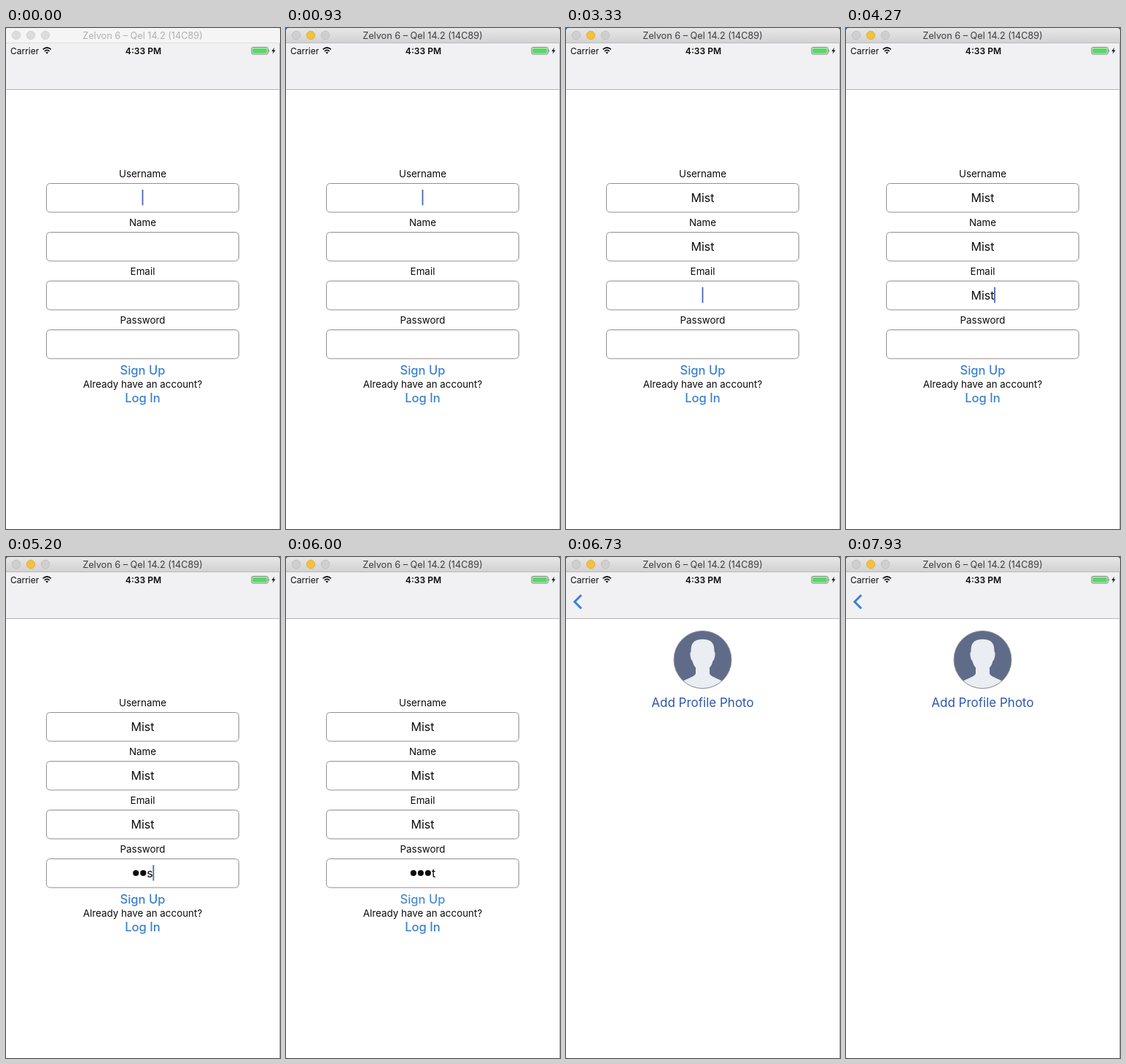
These frames come from a looping animation (376x688 px, 8000 ms). An HTML page:

```html
<!DOCTYPE html>
<html lang="en">
<head>
<meta charset="utf-8">
<title>Sign up form</title>
<style>
html, body { margin: 0; width: 100%; height: 100%; overflow: hidden; background: #fff; }
svg { display: block; width: 376px; height: 688px; }
text { font-family: Inter, Roboto, sans-serif; fill: #0b0b0b; }
.mid { text-anchor: middle; }
.label { font-size: 13.4px; }
.link { font-size: 16.6px; font-weight: 500; fill: #3a80d2; }
.value { font-size: 16px; }
</style>
</head>
<body>
<svg id="stage" viewBox="0 0 376 688">
  <defs>
    <linearGradient id="bar" x1="0" y1="0" x2="0" y2="1">
      <stop offset="0" stop-color="#e8e7e8"/>
      <stop offset="1" stop-color="#d3d2d3"/>
    </linearGradient>
    <clipPath id="disc"><circle cx="187.5" cy="141" r="39.5"/></clipPath>
  </defs>
  <rect width="376" height="688" fill="#fff"/>

  <g id="form">
    <g id="fields"></g>
    <text id="signUp" class="mid link" x="187.5" y="476">Sign Up</text>
    <text class="mid label" x="187.5" y="493.5">Already have an account?</text>
    <text class="mid link" x="187.5" y="514">Log In</text>
  </g>

  <g id="profile">
    <rect y="85" width="376" height="603" fill="#fff"/>
    <circle cx="187.5" cy="141" r="39.5" fill="#5f6b88"/>
    <path clip-path="url(#disc)" fill="#eaedf1" d="M187.5 113C198 113 204 117 203.500 130Q205.500 131 204 138Q203 142 201.500 143Q200 149 197 152V160C199 166 214 167 221 176V184H154V176C161 167 176 166 178 160V152Q175 149 173.500 143Q172 142 171 138Q169.500 131 171.500 130C171 117 177 113 187.500 113Z"/>
    <circle cx="187.5" cy="141" r="39.5" fill="none" stroke="#8b8d93"/>
    <text class="mid" x="187.5" y="206.300" font-size="17" style="fill:#2d57ab">Add Profile Photo</text>
  </g>

  <rect y="20" width="376" height="65" fill="#f1f1f3"/>
  <rect y="84" width="376" height="1" fill="#b4b4b7"/>
  <path id="back" d="M21 52.300L11.800 61.500L21 70.700" fill="none" stroke="#3a80d2" stroke-width="3"/>

  <text x="6" y="35.500" font-size="12">Carrier</text>
  <g fill="none" stroke="#111" stroke-width="1.700">
    <path d="M50.600 29.400Q56.200 24.600 61.800 29.400"/>
    <path d="M52.800 31.900Q56.200 28.900 59.600 31.900"/>
  </g>
  <path d="M54.300 33.500Q56.200 31.900 58.100 33.500L56.200 35.500Z" fill="#111"/>
  <text class="mid" x="188.500" y="35.500" font-size="12.100" font-weight="600">4:33 PM</text>
  <rect x="337" y="26.500" width="22.500" height="9.500" rx="2" fill="#fff" stroke="#66706a" stroke-width=".9"/>
  <rect x="338.200" y="27.700" width="20.100" height="7.100" rx="1" fill="#5bd768"/>
  <path d="M360.700 29.500Q362.400 31.200 360.700 33Z" fill="#555"/>
  <path d="M368.300 26.800L364.500 31.900H366.800L365.700 35.800L369.700 30.500H367.300Z" fill="#111"/>

  <g id="titleBar">
    <rect id="corners" width="376" height="6" fill="#2f5f94"/>
    <path id="barFill" d="M0 20V4Q0 0 4 0H372Q376 0 376 4V20Z"/>
    <rect id="barEdge" y="20" width="376" height="1"/>
    <g stroke-width=".8">
      <circle class="light" cx="14" cy="10" r="5.800"/>
      <circle class="light" id="yellow" cx="34" cy="10" r="5.800"/>
      <circle class="light" cx="54" cy="10" r="5.800"/>
    </g>
    <text id="title" class="mid" x="187.500" y="14.700" font-size="12.700">Zelvon 6 – Qel 14.2 (14C89)</text>
  </g>
  <rect x="375" y="21" width="1" height="667" fill="#b9b9bb"/>
</svg>

<script>
const LOOP = 8000, CX = 187.5, DOT = 10, WORD = "Mist";
const ACTIVATE = 400, PRESS = 5700, PUSH = 6050, PUSH_LEN = 250;
const $ = id => document.getElementById(id);
const clamp = (v, a = 0, b = 1) => Math.min(b, Math.max(a, v));

function el(tag, attrs, parent) {
  const node = document.createElementNS("http://www.w3.org/2000/svg", tag);
  set(node, attrs);
  return parent.appendChild(node);
}
function set(node, attrs) {
  for (const k in attrs) node.setAttribute(k, attrs[k]);
}

// focus and blur times, then the time of each key
const fields = [
  { name: "Username", focus: -300, blur: 1800, keys: [1000, 1130, 1270, 1400] },
  { name: "Name", focus: 1800, blur: 3200, keys: [2330, 2470, 2600, 2730] },
  { name: "Email", focus: 3200, blur: 4470, keys: [3670, 3800, 3930, 4070] },
  { name: "Password", focus: 4470, blur: PRESS + 100, keys: [4870, 5000, 5130, 5330], secret: true }
];

fields.forEach((f, i) => {
  const y = 67 * i, g = $("fields");
  el("text", { class: "mid label", x: CX, y: 205 + y }, g).textContent = f.name;
  el("rect", { x: 55.5, y: 213.5 + y, width: 264, height: 39.5, rx: 5, fill: "#fff", stroke: "#8e8e8e" }, g);
  f.dots = f.secret ? [0, 1, 2].map(() => el("circle", { cy: 233 + y, r: 4.1, fill: "#0b0b0b" }, g)) : [];
  f.text = el("text", { class: "value", y: 239 + y }, g);
  f.caret = el("rect", { y: 222 + y, width: 1.8, height: 21.5, fill: "#4b65b5" }, g);
});

function drawField(f, t) {
  const n = f.keys.filter(k => t >= k).length;
  const hidden = f.secret ? Math.max(0, n - 1) : 0;
  f.text.textContent = WORD.slice(hidden, n);
  const w = n ? f.text.getComputedTextLength() : 0;
  const x = CX - (w + hidden * DOT) / 2;
  f.dots.forEach((d, i) => set(d, { cx: x + DOT * (i + 0.5), opacity: i < hidden ? 1 : 0 }));
  f.text.setAttribute("x", x + hidden * DOT);
  const since = t - (n ? f.keys[n - 1] : f.focus);
  const on = t >= f.focus && t < f.blur && since % 1000 < 600;
  set(f.caret, { x: x + hidden * DOT + w - (n ? 0.3 : 0.9), opacity: on ? 1 : 0 });
}

// cubic-bezier(.42, 0, 1, 1), mirrored for the second half
function easeIn(x) {
  let lo = 0, hi = 1, s;
  for (let i = 0; i < 20; i++) {
    s = (lo + hi) / 2;
    const bx = 1.26 * s * (1 - s) ** 2 + 3 * s * s * (1 - s) + s ** 3;
    if (bx < x) lo = s; else hi = s;
  }
  return s * s * (3 - 2 * s);
}
const easeInOut = u => u <= 0 ? 0 : u >= 1 ? 1 :
  u < 0.5 ? easeIn(2 * u) / 2 : 1 - easeIn(2 - 2 * u) / 2;

function drawTitle(active) {
  set($("corners"), { fill: active ? "#2f5f94" : "#d5dbe1" });
  set($("barFill"), { fill: active ? "url(#bar)" : "#f5f5f5" });
  set($("barEdge"), { fill: active ? "#bcbbbd" : "#dedede" });
  document.querySelectorAll(".light").forEach(c =>
    set(c, { fill: active ? "#d0cfd0" : "#dcdcdc", stroke: active ? "#bcbbbc" : "#d0d0d0" }));
  if (active) set($("yellow"), { fill: "#f2c13d", stroke: "#dcaa35" });
  $("title").style.fill = active ? "#3c3c3c" : "#b0b0b0";
}

function pressOpacity(t) {
  const down = clamp((t - PRESS) / 100), up = clamp((t - PRESS - 120) / 230);
  return 1 - 0.8 * down * (1 - easeInOut(up));
}

function draw(t) {
  drawTitle(t >= ACTIVATE);
  fields.forEach(f => drawField(f, t));
  set($("signUp"), { opacity: pressOpacity(t) });
  const p = easeInOut((t - PUSH) / PUSH_LEN), k = 1 - 0.05 * p;
  set($("form"), {
    transform: `translate(${CX - 10 * p} 386) scale(${k}) translate(${-CX} -386)`,
    opacity: p < 1 ? 1 - 0.7 * p : 0
  });
  set($("profile"), { transform: `translate(${376 * (1 - p)} 0)` });
  set($("back"), { opacity: p });
}

const start = performance.now();
function tick() {
  draw((performance.now() - start) % LOOP);
  requestAnimationFrame(tick);
}
tick();
</script>
</body>
</html>
```
